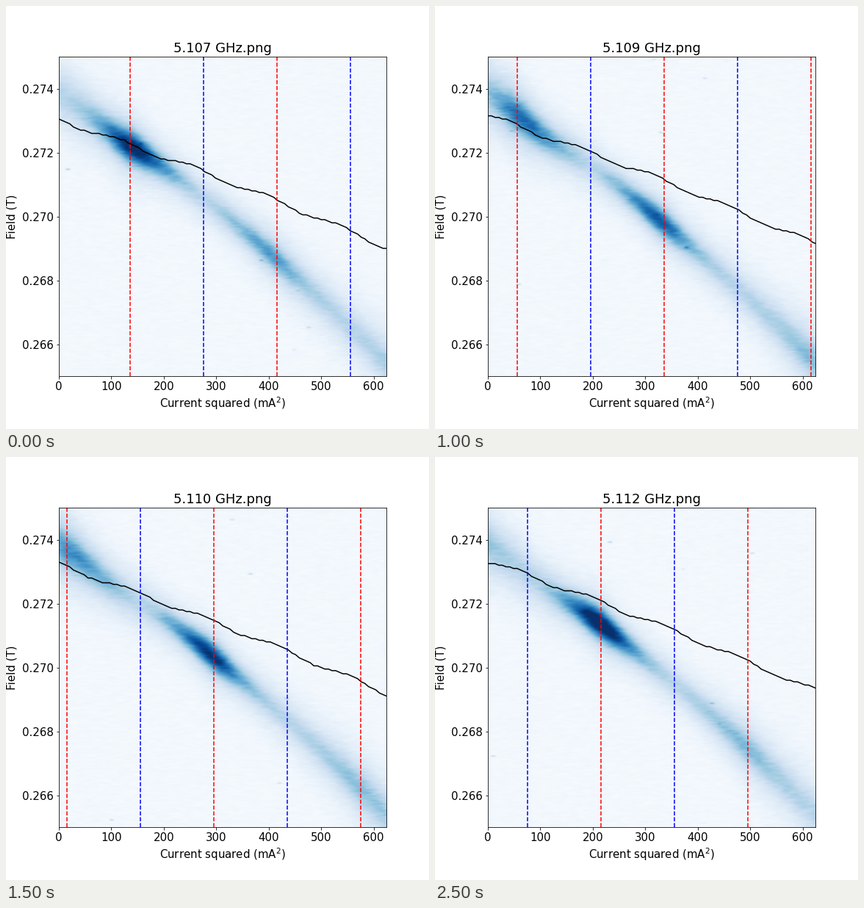
These frames come from a looping animation (576x576 px, 3000 ms). A matplotlib script:

```python
import numpy as np
import matplotlib.pyplot as plt
from matplotlib.animation import FuncAnimation

plt.rcParams.update({"font.family": "DejaVu Sans", "font.size": 15})

FRAMES = 6
X_MAX, B_MIN, B_MAX = 625, 0.265, 0.275
STEP = 0.00005            # field resolution; depths count steps below B_MAX
COLS, ROWS = 90, 200
GAP, DRIFT = 140, 40      # marker spacing and shift per frame, in mA^2


def bell(d, width):
    return np.exp(-0.5 * (d / width) ** 2)


def first_marker(k):
    return 136 - DRIFT * k


def signal(k):
    """Bright ridge, strongest at the red markers and faint at the blue ones."""
    rng = np.random.default_rng(40 + k)
    x = (np.arange(COLS) + 0.5) * X_MAX / COLS
    u = x / X_MAX
    depth = np.arange(ROWS)[:, None] + 0.5

    # signed distance to the nearest red marker
    d = (x - first_marker(k) + GAP) % (2 * GAP) - GAP
    core = bell(d, 28)
    lobe = 0.6 * np.cos(np.pi * d / (2 * GAP)) ** 2 + 0.4 * core
    gain = 0.12 + 0.8 * bell(x - 205, 113)

    centre = 23 + 132 * u + 37 * u ** 2 + 3 * bell(u - 0.18, 0.07)
    width = 4.8 + 11 * (u - 0.45) ** 2 + 1.2 * core * gain
    halo = (0.2 - 0.08 * u) * (1 + 0.4 * lobe)
    ridge = np.maximum(0.28 + gain * lobe - halo, 0)
    z = halo * bell(depth - centre, 2.3 * width)
    z += ridge * bell(depth - centre, width)

    noise = rng.normal(size=(ROWS, COLS + 1))
    noise = (noise[:, 1:] + noise[:, :-1]) / 1.4
    z += 0.024 + noise * (0.008 + 0.035 * np.minimum(z, 0.6))
    for _ in range(6):
        z[rng.integers(ROWS), rng.integers(COLS)] += rng.uniform(0.08, 0.35)
    return np.clip(z, 0, 1)


def trace(k):
    """Falling black line that levels off ahead of each marker."""
    x = np.linspace(0, X_MAX, COLS + 1)
    u = x / X_MAX
    n = 39.3 - 1.2 * k + (80 + 0.3 * k) * u - 2.5 * np.sin(np.pi * u)
    n -= 1.5 * np.cos(2 * np.pi * (x - first_marker(k) + 20) / GAP)
    return x, B_MAX - STEP * np.round(n)


maps = [signal(k) for k in range(FRAMES)]

fig = plt.figure(figsize=(8, 8), dpi=72)
ax = fig.add_axes([0.125, 0.125, 0.775, 0.755])
image = ax.imshow(maps[0], cmap="Blues", vmin=0, vmax=1, aspect="auto",
                  interpolation="bilinear", extent=(0, X_MAX, B_MIN, B_MAX))
line, = ax.plot(*trace(0), color="k", lw=1.5)
markers = [ax.axvline(0, color="rb"[j % 2], ls="--", lw=1.5) for j in range(5)]
title = ax.set_title("")
ax.set_xlim(0, X_MAX)
ax.set_ylim(B_MIN, B_MAX)
ax.set_xticks(range(0, 601, 100))
ax.set_yticks(np.arange(0.266, 0.2745, 0.002))
ax.yaxis.set_major_formatter("{x:.3f}")
ax.set_xlabel("Current squared (mA$^2$)")
ax.set_ylabel("Field (T)", labelpad=6)


def update(k):
    image.set_data(maps[k])
    line.set_data(*trace(k))
    for j, marker in enumerate(markers):
        x = first_marker(k) + GAP * j
        marker.set_xdata([x, x])
    title.set_text(f"{5.107 + 0.001 * k:.3f} GHz.png")
    return [image, line, title, *markers]


anim = FuncAnimation(fig, update, frames=FRAMES, interval=500, repeat=True)
plt.show()
```
